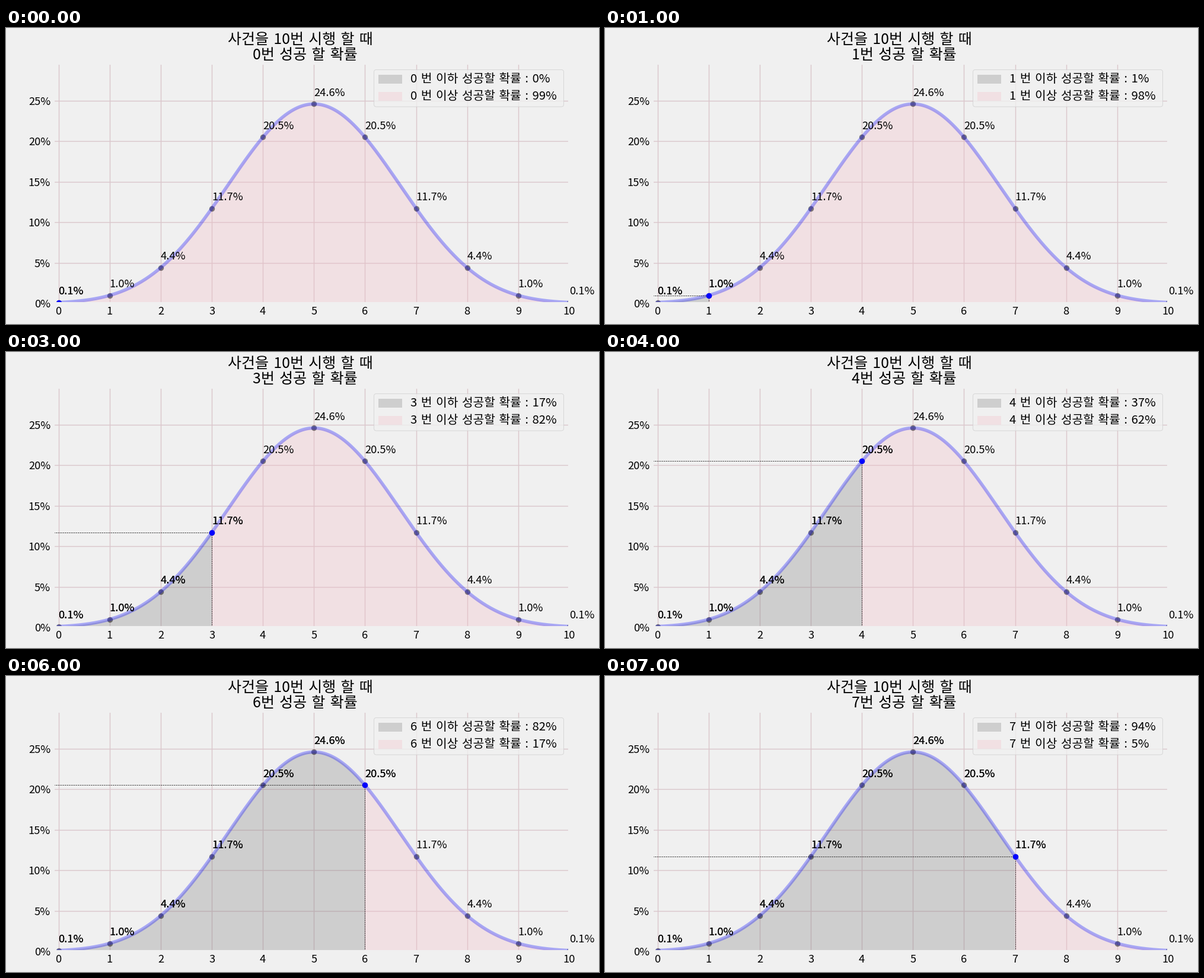
These frames come from a looping animation (1000 by 500 pixels, 8000 ms). A matplotlib script:

```python
import math

import matplotlib.pyplot as plt
import numpy as np
from matplotlib.animation import FuncAnimation
from matplotlib.patches import FancyBboxPatch, Rectangle

TRIALS = 10
LEFT = -0.1
BACKGROUND = "#f0f0f0"
GRID = "#dac6cb"
BELOW = dict(facecolor="gray", alpha=0.3, linewidth=0)
ABOVE = dict(facecolor="#f4bec7", alpha=0.3, linewidth=0)
WIDE_SPACE = "\u2004"

plt.rcParams["font.family"] = ["Noto Sans CJK JP", "DejaVu Sans"]


def binomial(x):
    """Binomial probability for p = 1/2, extended to real x by the gamma function."""
    ways = math.gamma(TRIALS + 1) / (math.gamma(x + 1) * math.gamma(TRIALS - x + 1))
    return ways / 2 ** TRIALS


counts = np.arange(TRIALS + 1)
chances = np.array([binomial(k) for k in counts])
cumulative = np.cumsum(chances)
xs = np.linspace(0, TRIALS, 501)
ys = np.array([binomial(x) for x in xs])

fig = plt.figure(figsize=(10, 5), dpi=100, facecolor=BACKGROUND)
ax = fig.add_axes([0.08, 0.07, 0.87, 0.81])
overlay = fig.add_axes([0, 0, 1, 1])


def label_point(k):
    ax.text(k, chances[k] + 0.01, f"{chances[k]:.1%}", fontsize=13.2, zorder=3)


def draw_chart(k):
    ax.clear()
    ax.set_facecolor(BACKGROUND)
    ax.set_xlim(LEFT, TRIALS)
    ax.set_ylim(0, chances.max() + 0.05)
    ax.set_axisbelow(True)
    ax.grid(color=GRID, linewidth=1)
    ax.set_xticks(counts)
    levels = np.arange(0, 26, 5)
    ax.set_yticks(levels / 100, [f"{level}%" for level in levels])
    ax.tick_params(length=0, pad=3.5, labelsize=13.2)
    for spine in ax.spines.values():
        spine.set(edgecolor=BACKGROUND, linewidth=3)

    ax.fill_between(xs, ys, where=xs <= k, **BELOW)
    ax.fill_between(xs, ys, where=xs >= k, **ABOVE)
    ax.scatter(counts, chances, s=46, color="black", alpha=0.48, linewidth=0)
    ax.plot(xs, ys, color="blue", alpha=0.3, linewidth=4)
    guide = dict(color="black", linestyle="--", linewidth=0.5)
    ax.plot([LEFT, k], [chances[k]] * 2, **guide)
    ax.plot([k, k], [0, chances[k]], **guide)
    ax.plot(k, chances[k], "o", color="blue", markersize=6.8, markeredgewidth=0)

    for i in counts:
        label_point(i)
    # Values already reached are printed twice, which makes them look heavier.
    for i in range(k + 1):
        label_point(i)


def korean(x, baseline, text, size, **style):
    overlay.text(x, baseline, text.replace(" ", WIDE_SPACE), fontsize=size, **style)


def draw_legend_row(top, style, text):
    overlay.add_patch(Rectangle((628, top), 40, 14.5, **style))
    korean(681.5, top + 13, text, 14.6)


def draw_overlay(k):
    overlay.clear()
    overlay.set_xlim(0, 1000)
    overlay.set_ylim(500, 0)
    overlay.axis("off")
    korean(496, 27, f"사건을 {TRIALS}번 시행 할 때", 18, ha="center")
    korean(504, 53, f"{k}번 성공 할 확률", 18, ha="center")
    overlay.add_patch(FancyBboxPatch(
        (620.5, 70.5), 320, 62.5, boxstyle="round,pad=0,rounding_size=4",
        facecolor=BACKGROUND, edgecolor="0.8", alpha=0.8, linewidth=0.6))
    share = cumulative[k]
    draw_legend_row(79, BELOW, f"{k} 번 이하 성공할 확률 : {int(share * 100)}%")
    draw_legend_row(108, ABOVE, f"{k} 번 이상 성공할 확률 : {int((1 - share) * 100)}%")


def update(k):
    draw_chart(k)
    draw_overlay(k)
    return []


animation = FuncAnimation(fig, update, frames=8, interval=1000, repeat=True,
                          repeat_delay=0, init_func=lambda: [])
plt.show()
```
